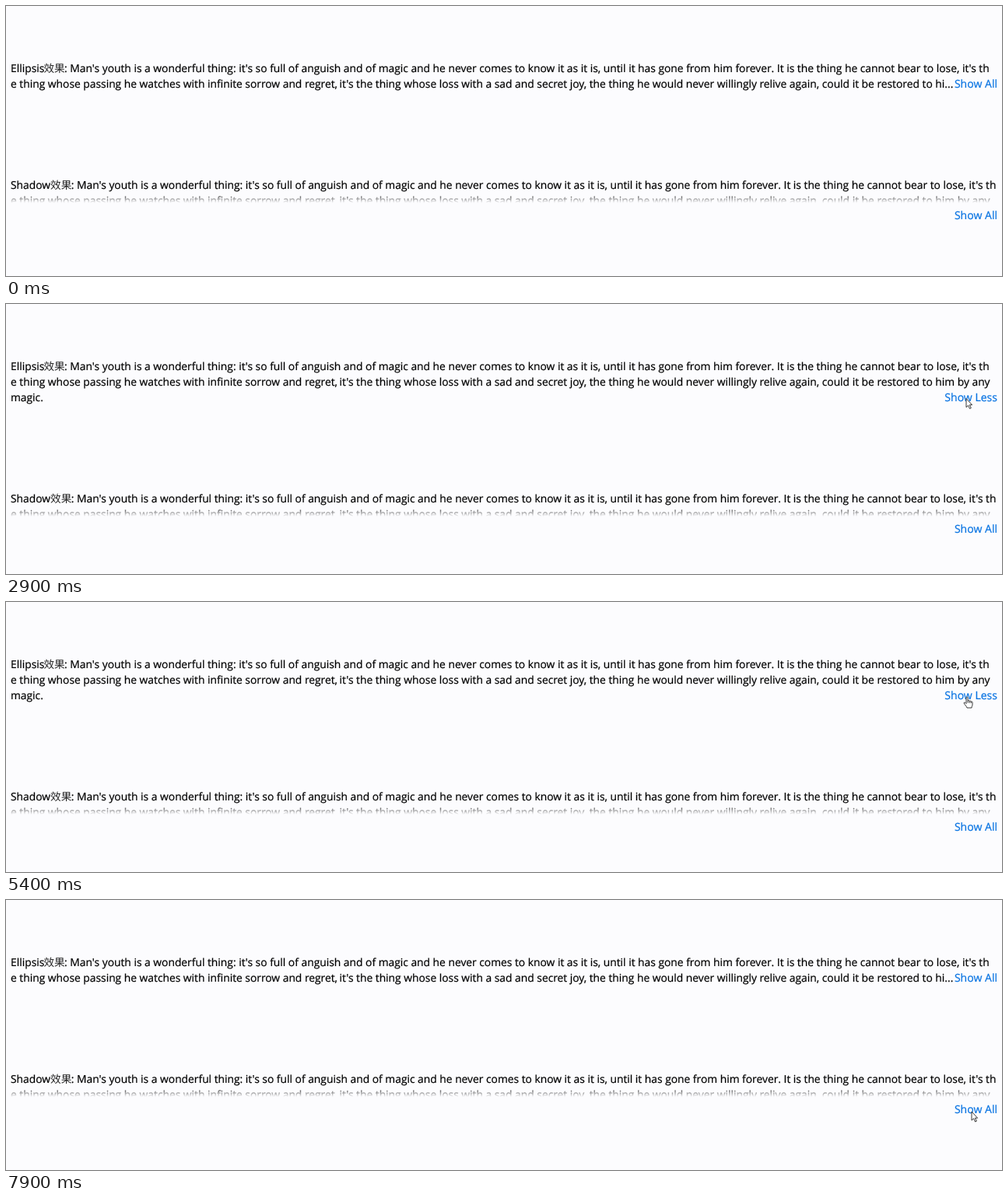
An HTML page that plays this animation: 1280 px wide and 347 px high, repeating every 8000 ms.

```html
<!DOCTYPE html>
<html lang="en">
<head>
<meta charset="utf-8">
<title>Ellipsis and shadow</title>
<style>
  html, body { margin: 0; width: 100%; height: 100%; overflow: hidden; background: #fcfcfe; }
  svg { display: block; width: 100%; height: 100%; }
  text { font: 13.82px "Open Sans", "Noto Sans", sans-serif; fill: #000; stroke: #000; stroke-width: .22; text-rendering: geometricPrecision; }
  .cjk { font: 300 13.6px "Noto Sans CJK SC", "Noto Sans CJK", sans-serif; fill: #222; stroke: none; }
  .link { font-size: 14.05px; fill: #0873e2; stroke: #0873e2; text-anchor: end; }
  .pointer path { fill: #fff; stroke: #222; stroke-width: .9; stroke-linejoin: round; }
</style>
</head>
<body>
<svg viewBox="0 0 1280 347">
  <defs>
    <linearGradient id="fade" x1="0" y1="0" x2="0" y2="1">
      <stop offset="0" stop-color="#fcfcfe" stop-opacity="0"/>
      <stop offset="1" stop-color="#fcfcfe"/>
    </linearGradient>
  </defs>
  <g id="ellipsis"></g>
  <g id="closed"></g>
  <g id="open"></g>
  <g id="shadow"></g>
  <g id="cursor" class="pointer">
    <path id="arrow" d="M0 0V11.2L2.6 8.8L4.5 13L6.3 12.2L4.4 8.2H7.6Z"/>
    <g id="hand">
      <path d="M-1 1C-1-.3 1.1-.3 1.1 1V5.2C1.3 4.2 3.2 4.4 3.2 5.6C3.6 4.7 5.2 5 5.2 6.2C5.7 5.5 7 5.9 7 7V10C7 11.5 6 12 6 14H0C0 12.4-3.6 9.4-3.9 7.9C-4 6.8-2.7 6.6-1 8.6Z"/>
      <path d="M1.1 5.2V7.6M3.2 5.6V7.8M5.2 6.2V8"/>
    </g>
    <path id="beam" d="M-2.5-5.5H-.6L0-5L.6-5.5H2.5M0-5V5M-2.5 5.5H-.6L0 5L.6 5.5H2.5" style="fill:none"/>
  </g>
</svg>
<script>
const LOOP = 8000;
const SVG = "http://www.w3.org/2000/svg";
const byId = id => document.getElementById(id);

const OPENING = ": Man's youth is a wonderful thing: it's so full of anguish and of magic and he never comes to know it as it is, until it has gone from him forever. It is the thing he cannot bear to lose, it's th";
const SECOND = "e thing whose passing he watches with infinite sorrow and regret,";
const THIRD = "it's the thing whose loss with a sad and secret joy, the thing he would never willingly relive again, could it be restored to hi";

function add(group, tag, attributes, content = "") {
  const node = document.createElementNS(SVG, tag);
  for (const name in attributes) node.setAttribute(name, attributes[name]);
  node.textContent = content;
  byId(group).append(node);
}

function write(group, x, y, content, className = "") {
  add(group, "text", { x, y, class: className }, content);
}

function writeHeading(group, label, labelEnd, y) {
  write(group, 6, y, label);
  write(group, labelEnd, y, "效果", "cjk");
  write(group, labelEnd + 26.7, y, OPENING);
  write(group, 6, y + 20, SECOND);
}

const link = (group, y, label) => write(group, 1274, y, label, "link");

writeHeading("ellipsis", "Ellipsis", 48.4, 85);
write("closed", 428.6, 105, THIRD + "...");
link("closed", 105, "Show All");
write("open", 428.6, 105, THIRD + "m by any");
write("open", 6, 125, "magic.");
link("open", 125, "Show Less");

writeHeading("shadow", "Shadow", 57.1, 235);
write("shadow", 428.6, 255, THIRD + "m by any");
add("shadow", "path", { d: "M0 239.5H1280V253H0Z", fill: "url(#fade)" });
add("shadow", "path", { d: "M0 253H1280V262H0Z", fill: "#fcfcfe" });
link("shadow", 274, "Show All");

// Times at which the first paragraph expands or collapses.
const toggles = [1600, 3100, 4400, 6300];

// time, x, y, cursor shape from that time on
const path = [
  [100, 1226, 336, "arrow"],
  [300, 1227, 308, "arrow"],
  [500, 1230, 250, "beam"],
  [600, 1231, 215, "arrow"],
  [800, 1236, 150, "arrow"],
  [1100, 1240, 106, "beam"],
  [1300, 1241, 100, "beam"],
  [2300, 1241, 100, "beam"],
  [2800, 1234, 121.5, "arrow"],
  [3000, 1234, 121.5, "hand"],
  [3100, 1234, 121.5, "arrow"],
  [3300, 1234, 121.5, "arrow"],
  [3600, 1242, 101, "hand"],
  [4400, 1242, 101, "beam"],
  [4800, 1242, 101, "beam"],
  [5100, 1235, 122, "hand"],
  [6100, 1235, 122, "hand"],
  [6300, 1234, 122, "arrow"],
  [6600, 1234, 124, "arrow"],
  [6900, 1238, 220, "beam"],
  [7100, 1241, 267, "arrow"],
  [7300, 1241, 273, "arrow"],
  [7600, 1241, 272, "arrow"],
  [LOOP, 1241, 272, "arrow"]
];

function showCursor(time) {
  const cursor = byId("cursor");
  const next = path.findIndex(step => step[0] > time);
  cursor.style.display = next > 0 ? "" : "none";
  if (next < 1) return;
  const [t0, x0, y0, shape] = path[next - 1];
  const [t1, x1, y1] = path[next];
  const k = (time - t0) / (t1 - t0);
  cursor.setAttribute("transform", `translate(${x0 + (x1 - x0) * k} ${y0 + (y1 - y0) * k})`);
  for (const name of ["arrow", "hand", "beam"]) {
    byId(name).style.display = name === shape ? "" : "none";
  }
}

function render(now) {
  // The picture advances in tenths and skips every fifth one.
  let tick = Math.floor(now % LOOP / 100);
  if (tick % 5 === 2) tick--;
  const time = tick * 100;
  const expanded = toggles.filter(t => t <= time).length % 2 === 1;
  byId("open").style.display = expanded ? "" : "none";
  byId("closed").style.display = expanded ? "none" : "";
  byId("shadow").setAttribute("transform", `translate(0 ${expanded ? 20 : 0})`);
  showCursor(time);
}

const start = performance.now();
function loop() {
  render(performance.now() - start);
  requestAnimationFrame(loop);
}
loop();
</script>
</body>
</html>
```
